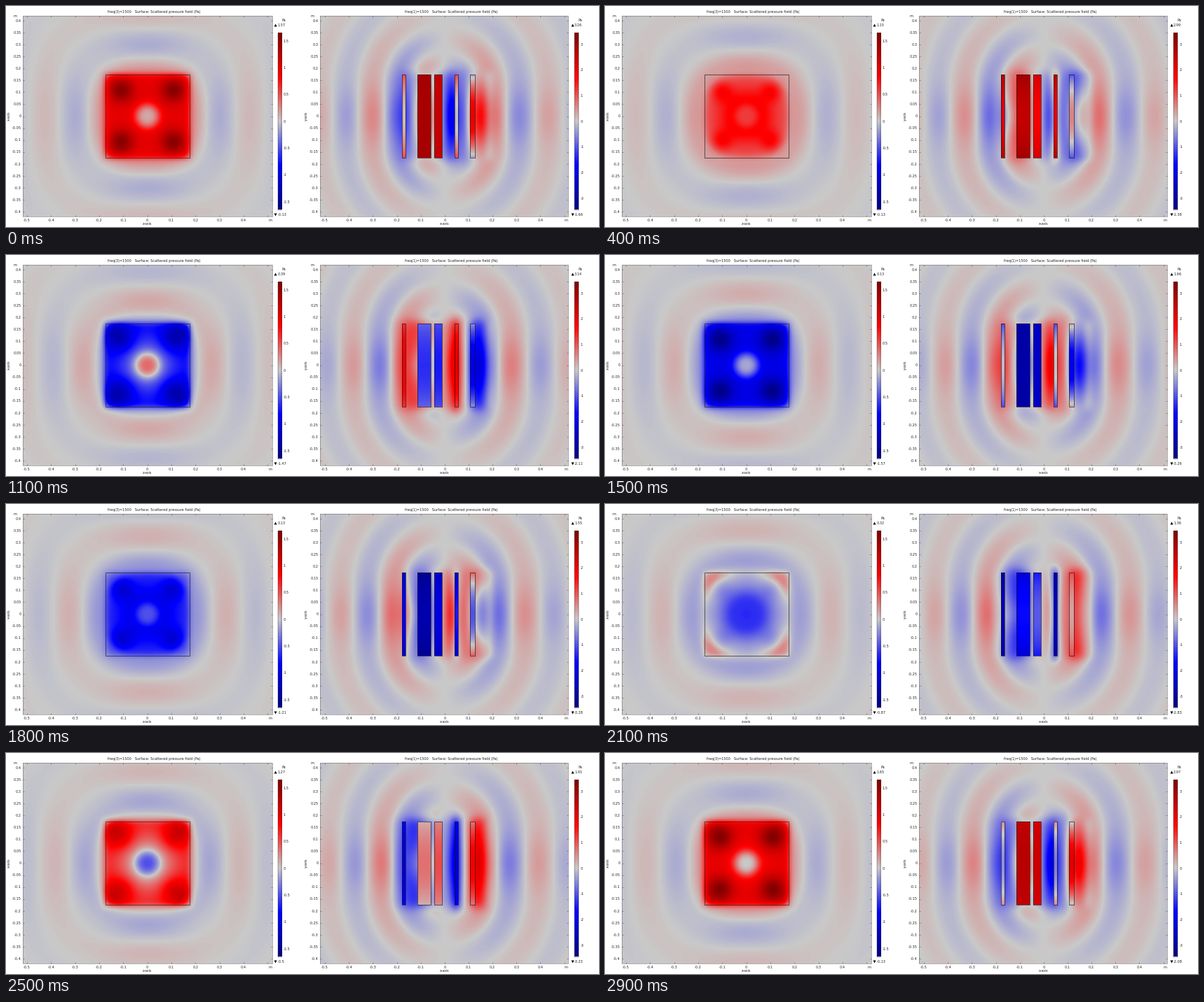
A matplotlib script for the animation above (3 s loop, 846x316 px).

```python
import numpy as np
import matplotlib.pyplot as plt
from matplotlib.animation import FuncAnimation
from matplotlib.colors import LinearSegmentedColormap, Normalize
from matplotlib.patches import Rectangle

W, H, DPI = 846, 316, 100
FRAMES, STEP = 30, 100
PX = 72 / DPI
TOP, BOTTOM, MID_Y, SCALE_Y = 14, 301, 157.5, 341
HALF = 0.175

plt.rcParams["font.family"] = "DejaVu Sans"
WAVE = LinearSegmentedColormap.from_list("wave", [
    (0, (0, 0, 0.5)), (0.25, (0, 0, 1)), (0.5, (0.79, 0.79, 0.79)),
    (0.75, (1, 0, 0)), (1, (0.5, 0, 0))], N=512)

# Strongest spots of each field: (amplitude, step at which they peak).
SPOTS_L = [(1.665, 28.34), (1.184, 27.2), (1.23, 2.25), (0.67, 6.5)]
SPOTS_R = [(3.44, 1.53), (3.23, 9.85), (2.88, 6.9), (1.7, 16),
           (1.44, 22.6), (2.23, 27.6)]

# Panels on the right: x range, then (centre, end) of the in-phase and
# quadrature pressure.
PANELS = [
    (-0.177, -0.162, (0.1, 1.1), (2.75, 2.75)),
    (-0.1125, -0.0585, (2.9, 2.9), (0.8, 1.4)),
    (-0.042, -0.012, (2.5, 2.5), (0.2, 0.8)),
    (0.041, 0.056, (-0.1, 1.1), (2.7, 2.7)),
    (0.107, 0.127, (2.0, -0.4), (-1.0, -1.0)),
]


def sigmoid(v):
    return 1 / (1 + np.exp(-np.clip(v, -50, 50)))


def bump(v, mid, width):
    return np.exp(-((v - mid) / width) ** 2)


def grid(left, right, x0, scale):
    cols = (np.arange(left, right) + 0.5 - x0) / scale
    rows = (MID_Y - np.arange(TOP, BOTTOM) - 0.5) / SCALE_Y
    return np.meshgrid(cols, rows)


def blend(w, inner, outer):
    return [w * i + (1 - w) * o for i, o in zip(inner, outer)]


def outgoing(amp, psi):
    return amp * np.cos(psi), -amp * np.sin(psi)


def front_field(x, y):
    """In-phase and quadrature pressure around the square plate."""
    ax, ay = abs(x), abs(y)
    r = np.hypot(x, y) + 1e-9

    ring = 0.98 - 0.84 * np.exp(-(r / 0.053) ** 3)
    corners = 0.62 * bump(ax, 0.108, 0.05) * bump(ay, 0.108, 0.05)
    core = 0.91 * bump(r, 0, 0.1) - 0.25
    wedges = 0.45 * np.minimum((50 * x * y) ** 2, 1)

    rho = (ax ** 3.2 + ay ** 3.2) ** (1 / 3.2)
    diag = (2 * x * y / r ** 2) ** 2
    fade = 0.65 * np.clip((rho - 0.18) / 0.1, 0, 1)
    amp = 0.14 * (0.27 / np.maximum(rho, 0.17)) ** 1.4 * (1 - fade * diag)

    square = (ax ** 12 + ay ** 12) ** (1 / 12)
    inside = sigmoid((0.175 - square) / 0.007)
    return blend(inside, (ring + corners, core - wedges),
                 outgoing(amp, 4.72 - 25.6 * rho))


def side_field(x, y):
    """In-phase and quadrature pressure around the row of panels."""
    ax, ay = abs(x), abs(y)

    rho = np.hypot(ax, np.maximum(ay - 0.13, 0)) + 1e-9
    psi = np.where(x > 0, 5.285 - 26.5 * rho, 8.9 - 29 * rho)
    amp = 0.75 * (0.25 / np.maximum(rho, 0.2)) ** 1.4
    amp = amp * ax / rho * (0.4 + 0.6 * bump(y, 0, 0.12))

    line_a = (0.8 * bump(x, -0.08, 0.045) - 1.3 * bump(x, -0.175, 0.045)
              - 2.0 * bump(x, 0.03, 0.035) - 0.6 * bump(x, 0.08, 0.02)
              + 1.7 * bump(x, 0.15, 0.04))
    hump = np.cos(np.pi * np.clip(y, -0.2, 0.2) / 0.4) ** 2
    near_a = line_a * (0.35 + 0.65 * hump) - 0.3 * (1 - hump)
    near_b = (1.4 * bump(x, -0.115, 0.065) * (1 - 0.35 * bump(y, 0, 0.07))
              + 1.2 * bump(x, 0.047, 0.022) - 1.6 * bump(x, 0.135, 0.045))

    w = sigmoid((0.2 - ax) / 0.012) * sigmoid((0.185 - ay) / 0.012)
    a, b = blend(w, (near_a, near_b), outgoing(amp, psi))
    bow = (y / HALF) ** 2
    for lo, hi, (a0, a1), (b0, b1) in PANELS:
        m = (x > lo) & (x < hi) & (ay < HALF)
        a[m] = (a0 + (a1 - a0) * bow)[m]
        b[m] = (b0 + (b1 - b0) * bow)[m]
    return a, b


fig = plt.figure(figsize=(W / DPI, H / DPI), dpi=DPI, facecolor="white")
ax = fig.add_axes([0, 0, 1, 1])
ax.axis("off")


def label(x, y, s, ha="center", size=5.0, **kw):
    return ax.text(x, y, s, ha=ha, va="center", fontsize=size * PX,
                   color="#222222", **kw)


def tick(xs, ys):
    ax.plot(xs, ys, color="#444444", lw=0.5 * PX, solid_capstyle="butt")


def outline(x, y, w, h, color="#111111", width=0.6):
    ax.add_patch(Rectangle((x, y), w, h, fill=False, ec=color, lw=width * PX))


class Plot:
    def __init__(self, left, right, x0, scale, field, vmax, spots, floor,
                 title, names, bar, ticks, plates):
        self.a, self.b = field(*grid(left, right, x0, scale))
        self.spots, self.floor = spots, floor
        norm = Normalize(-vmax, vmax)
        self.img = ax.imshow(self.a, cmap=WAVE, norm=norm, aspect="auto",
                             extent=(left, right, BOTTOM, TOP),
                             interpolation="nearest")
        for lo, hi in plates:
            outline(x0 + lo * scale, MID_Y - HALF * SCALE_Y,
                    (hi - lo) * scale, 2 * HALF * SCALE_Y)
        self.axes(left, right, x0, scale)
        off = left - 24
        label(off + 211, 8.4, title)
        label(x0, 311.7, names[0], size=4.6)
        label(off + 4, MID_Y, names[1], size=4.6, rotation=90)
        label(off + 13, 15, "m")
        label(right - 3, 306, "m")
        self.colorbar(bar, vmax, norm, ticks)

    def axes(self, left, right, x0, scale):
        outline(left, TOP, right - left, BOTTOM - TOP, "#666666", 0.5)
        for i in range(-5, 6):
            x = x0 + i / 10 * scale
            tick([x, x], [TOP, TOP + 2])
            tick([x, x], [BOTTOM - 2, BOTTOM])
            if i < 5:
                label(x, 306, f"{i / 10:g}")
        for i in range(-8, 9):
            y = MID_Y - i / 20 * SCALE_Y
            tick([left, left + 2], [y, y])
            tick([right - 2, right], [y, y])
            label(left - 2, y + 0.3, f"{i / 20:g}", "right")

    def colorbar(self, x, vmax, norm, ticks):
        y0, y1 = 39, 291.5
        ramp = np.linspace(vmax, -vmax, 253)[:, None]
        ax.imshow(ramp, cmap=WAVE, norm=norm, aspect="auto",
                  extent=(x, x + 5.5, y1, y0), interpolation="nearest")
        outline(x, y0, 5.5, y1 - y0, "#333333", 0.4)
        for t in ticks:
            y = (y0 + y1) / 2 - t / vmax * (y1 - y0) / 2
            label(x + 8.5, y, f"{t:g}", "left")
        label(x + 8.5, 20, "Pa")
        for y, mark in ((27, "^"), (298, "v")):
            ax.plot([x - 3.5], [y], mark, color="black", ms=4 * PX, mew=0)
        self.high = label(x, 27.3, "", "left")
        self.low = label(x, 298.3, "", "left")

    def peak(self, k):
        """Largest value at step k: the leading one of the strong spots."""
        swing = [r * np.cos(2 * np.pi * (k - k0) / FRAMES)
                 for r, k0 in self.spots]
        return round(float(max(self.floor, *swing)), 2)

    def update(self, k):
        t = 2 * np.pi * k / FRAMES
        self.img.set_data(self.a * np.cos(t) + self.b * np.sin(t))
        self.high.set_text(f"{self.peak(k):g}")
        self.low.set_text(f"{-self.peak(k + FRAMES // 2):g}")
        return self.img, self.high, self.low


TITLE = "freq({})=1500   Surface: Scattered pressure field (Pa)"
plots = [
    Plot(24, 380, 201.7, 343.5, front_field, 1.65, SPOTS_L, 0.13,
         TITLE.format(3), ("z-axis", "x-axis"), 387.5,
         np.arange(-1.5, 1.6, 0.5), [(-HALF, HALF)]),
    Plot(448, 802, 625.8, 341.5, side_field, 3.44, SPOTS_R, 1.3,
         TITLE.format(1), ("x-axis", "y-axis"), 811, range(-3, 4),
         [p[:2] for p in PANELS]),
]
ax.set_xlim(0, W)
ax.set_ylim(H, 0)


def draw(k):
    return [artist for p in plots for artist in p.update(k)]


anim = FuncAnimation(fig, draw, frames=FRAMES, interval=STEP, repeat=True,
                     repeat_delay=0, init_func=lambda: draw(0))
plt.show()
```
